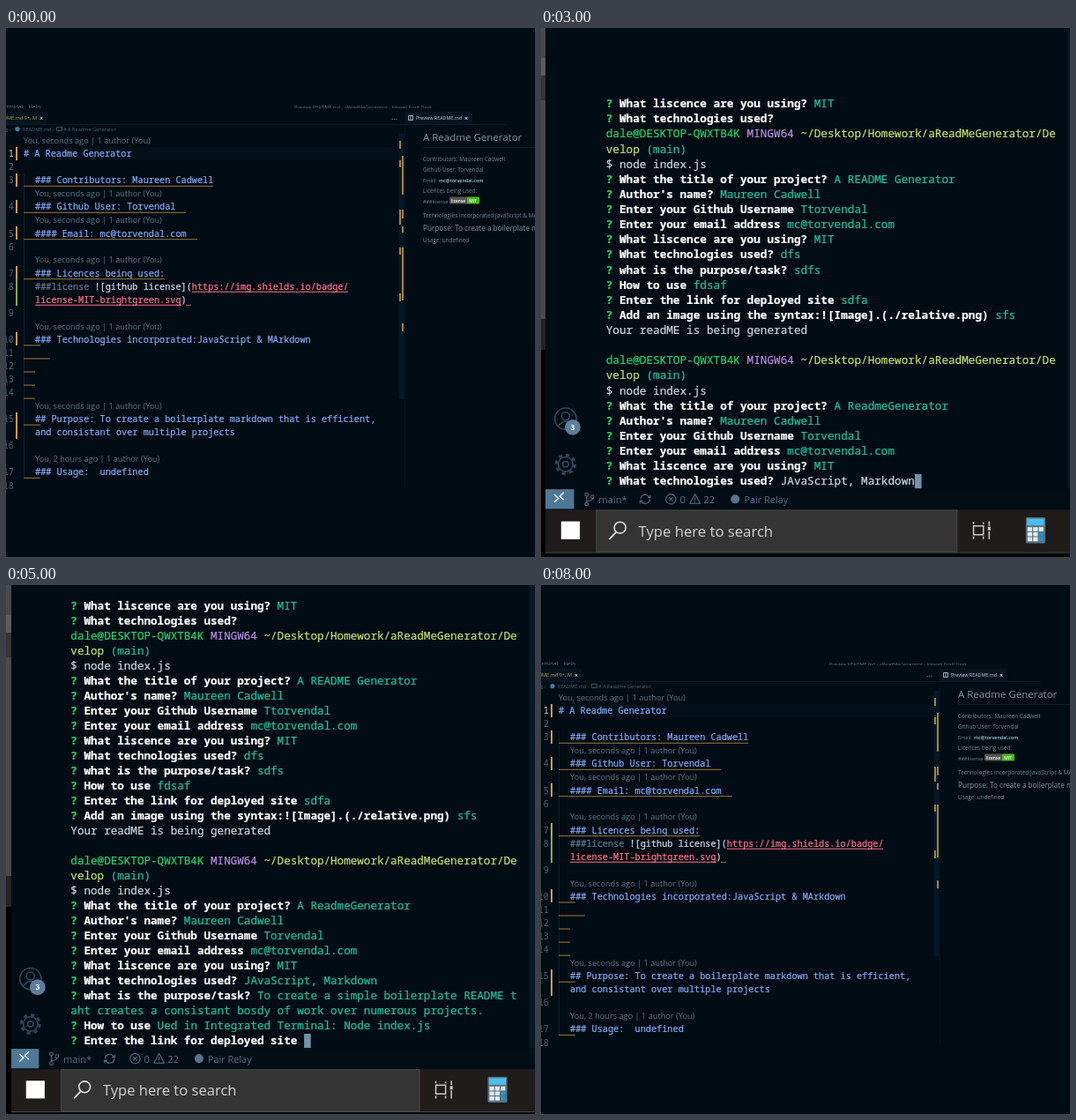
Recreate the animation shown at these times as an HTML page. Size 600 by 600 pixels, loop 9 s.

```html
<!DOCTYPE html>
<html lang="en">
<head>
<meta charset="utf-8">
<title>Readme generator</title>
<style>
  html, body { margin: 0; width: 100%; height: 100%; overflow: hidden; background: #020c14; }
  svg { display: block; width: 600px; height: 600px; }
  text { white-space: pre; font-family: "Open Sans", "Noto Sans", sans-serif; }
  .mono { font-family: "Noto Sans Mono", "DejaVu Sans Mono", monospace; stroke-width: .22px; }
</style>
</head>
<body>
<svg id="stage" viewBox="0 0 600 600" xmlns="http://www.w3.org/2000/svg"></svg>
<script>
const BG = '#020c14', SLATE = '#56748c', AMBER = '#c79f45', RUST = '#7d6230';
const GREEN = '#25d46d', TEAL = '#20c2a2', LIME = '#c3de70', MAUVE = '#bd8ce2', PALE = '#cdd7df', WHITE = '#fff';

const esc = s => s.replace(/&/g, '&amp;').replace(/</g, '&lt;');
const rect = (x, y, w, h, fill, extra = '') =>
  `<rect x="${x}" y="${y}" width="${w}" height="${h}" fill="${fill}" ${extra}/>`;
const line = (d, color, width = 1) =>
  `<path d="${d}" fill="none" stroke="${color}" stroke-width="${width}"/>`;
const ring = (x, y, r, color, width = 1, extra = '') =>
  `<circle cx="${x}" cy="${y}" r="${r}" fill="none" stroke="${color}" stroke-width="${width}" ${extra}/>`;
const dot = (x, y, r, fill) => `<circle cx="${x}" cy="${y}" r="${r}" fill="${fill}"/>`;
const text = (x, y, size, fill, s, extra = '') =>
  `<text x="${x}" y="${y}" font-size="${size}" fill="${fill}" ${extra}>${esc(s)}</text>`;
const spans = (x, y, size, parts) =>
  `<text class="mono" x="${x}" y="${y}" font-size="${size}">` + parts.map(([fill, s, weight = 400]) =>
    `<tspan fill="${fill}" stroke="${fill}" font-weight="${weight}">${esc(s)}</tspan>`).join('') + '</text>';

/* Editor with preview */

const rowY = i => 127.6 + 15.05 * i;
const HEAD = '#82aaf5';

// [row, line number, text, indent, underline end]
const codeRows = [
  [1, 1, '# A Readme Generator', 20, 0],
  [2, 2], [3, 3, '### Contributors: Maureen Cadwell', 33, 235],
  [5, 4, '### Github User: Torvendal', 33, 204],
  [7, 5, '#### Email: mc@torvendal.com', 33, 217],
  [8, 6], [10, 7, '### Licences being used:', 33, 180],
  [11, 8], [13, 9],
  [15, 10, '### Technologies incorporated:JavaScript & MArkdown', 33, 39],
  [16, 11, '', 33, 50], [17, 12, '', 33, 33], [18, 13, '', 33, 33], [19, 14, '', 33, 33],
  [21, 15, '## Purpose: To create a boilerplate markdown that is efficient,', 33, 39],
  [22, '', 'and consistant over multiple projects', 33, 0],
  [23, 16], [25, 17, '### Usage:  undefined', 33, 39], [26, 18]
];

function editor() {
  const out = [rect(0, 0, 600, 600, BG)];

  // window title and tabs
  out.push('<clipPath id="bar"><rect y="86" width="600" height="5"/></clipPath><g clip-path="url(#bar)">',
    text(-6, 91.5, 6.2, SLATE, 'Terminal    Help'),
    text(327, 91.5, 5.4, SLATE, 'Preview README.md - aReadMeGenerator - Inkwell Draft Desk'), '</g>',
    rect(0, 95, 46, 14, '#06141f'), rect(453, 95, 76, 14, '#06141f'),
    text(35, 104.3, 5.6, '#c29a4c', 'README.md 9+, M', 'text-anchor="end"'),
    text(38, 104.6, 7, PALE, '×', 'font-weight="700"'),
    text(437, 103.5, 9, '#8fa3b3', '…'),
    line('M456.5 99.5h5v5h-5zM459 99.5v5', '#9fb1bf'),
    text(465, 104.4, 5.4, '#c8d2da', 'Preview README.md'),
    text(520, 104.6, 7, PALE, '×', 'font-weight="700"'),
    line('M0 109.5H567', '#0a1a26'), line('M452.5 95V520', '#06131d'));

  // breadcrumb
  out.push(text(-1, 117, 5.8, '#4d6578', 'g ›'), dot(13, 114.7, 2.6, '#3b80a8'),
    text(19, 117, 5.6, '#4d6578', 'README.md ›'),
    line('M57.5 112.5h6v4h-6z', '#4d6578', .8), text(65, 117, 5.6, '#4d6578', '# A Readme Generator'));

  // gutter, guides and scrollbar
  out.push(rect(20, 135, 426, 15, '#03101a'), line('M20.5 165V510', '#0d202e'),
    rect(445.5, 120, 6, 301, '#061727'));
  for (const [y, h, c = AMBER] of [[135, 15], [165, 15], [195, 15], [225, 15], [270, 15],
    [285, 30, '#84aa55'], [345, 15], [436, 30]]) out.push(rect(11, y, 2, h, c));
  for (const [x, y, h] of [[446, 128, 9], [449, 145, 44], [446, 150, 8], [446, 206, 17], [449, 206, 10],
    [449, 225, 7], [449, 249, 60], [446, 249, 8], [446, 301, 9], [449, 335, 9]])
    out.push(rect(x, y, 2, h, AMBER, 'opacity=".8"'));

  // annotations above the blocks
  [0, 4, 6, 9, 14, 20, 24].forEach((r, i) => out.push(text(i ? 33 : 20, rowY(r) + 3.4, 9.2, '#5f7789',
    `You, ${i === 6 ? '2 hours' : 'seconds'} ago | 1 author (You)`)));

  for (const [r, n, s, x, end] of codeRows) {
    const y = rowY(r) + 3.6;
    out.push(text(9, y, 10.23, n === 1 ? PALE : '#4b6479', String(n), 'class="mono" text-anchor="end"'));
    if (s) out.push(spans(x, y, 10.23, [[HEAD, s, 500]]));
    if (end) out.push(line(`M20 ${rowY(r) + 6.6}H${end}`, RUST, 1.3));
  }
  const link = '#ff7089', y = rowY(11) + 3.6;
  out.push(spans(33, y, 10.23, [['#637b92', '###license '], ['#d6deeb', '![github license](', 500],
      [link, 'https://img.shields.io/badge/', 500]]),
    spans(33, y + 15.05, 10.23, [[link, 'license-MIT-brightgreen.svg', 500], ['#d6deeb', ')', 500]]),
    line('M211 299.3H388M33 314.3H199', link, 1.1), line('M204 314.5H210', RUST, 1.3));

  // rendered preview
  const ink = '#73899a';
  out.push(text(473, 128.3, 11.5, '#8497a6', 'A Readme Generator'), line('M473 135.5H600', '#0b1c28'),
    text(473, 150.6, 6.4, ink, 'Contributors: Maureen Cadwell'),
    text(473, 163, 6.4, ink, 'Github User: Torvendal'),
    text(473, 174.7, 5.6, ink, 'Email:'),
    text(491, 174.7, 5.4, '#9fd6e0', 'mc@torvendal.com', 'font-weight="600"'),
    text(473, 186.5, 6.4, ink, 'Licences being used:'),
    text(473, 199.2, 5.5, ink, '###license'),
    rect(503, 191.5, 21, 8, '#555', 'rx="1"'), rect(523, 191.5, 14, 8, '#43b81c', 'rx="1"'),
    text(505, 197.5, 4.8, WHITE, 'license', 'font-weight="600"'),
    text(525.3, 197.5, 4.8, WHITE, 'MIT', 'font-weight="600"'),
    text(473, 214.5, 6.5, ink, 'Technologies incorporated:JavaScript & MArkdown'),
    text(473, 229.6, 8.2, '#8497a6', 'Purpose: To create a boilerplate markdown that is efficient'),
    text(473, 243.3, 6.4, ink, 'Usage: undefined'));
  return out.join('');
}

/* Terminal */

const COLS = 67, CELL = 7.52, ROW = 16.92, LEFT = 75.3, BOTTOM = 516;

const ask = (label, reply = '') => [[GREEN, '? ', 700], [WHITE, label + ' ', 700], [TEAL, reply]];
const prompt = [[GREEN, 'dale@DESKTOP-QWXTB4K '], [MAUVE, 'MINGW64 '],
  [LIME, '~/Desktop/Homework/aReadMeGenerator/Develop '], [TEAL, '(main)']];
const say = s => [[PALE, s]];

const session = (title, author, user, mail, license, tech, task, use, site, image) => [
  prompt, say('$ node index.js'),
  ask('What the title of your project?', title),
  ask("Author's name?", author),
  ask('Enter your Github Username', user),
  ask('Enter your email address', mail),
  ask('What liscence are you using?', license),
  ask('What technologies used?', tech),
  ask('what is the purpose/task?', task),
  ask('How to use', use),
  ask('Enter the link for deployed site', site),
  ask('Add an image using the syntax:![Image].(./relative.png)', image),
  say('Your readME is being generated'), say('')
];

const entries = [
  ask('What liscence are you using?', 'MIT'), ask('What technologies used?'),
  ...session('A README Generator', 'Maureen Cadwell', 'Ttorvendal', 'mc@torvendal.com', 'MIT',
    'dfs', 'sdfs', 'fdsaf', 'sdfa', 'sfs'),
  ...session('A ReadmeGenerator', 'Maureen Cadwell', 'Torvendal', 'mc@torvendal.com', 'MIT',
    'JAvaScript, Markdown',
    'To create a simple boilerplate README taht creates a consistant bosdy of work over numerous projects.',
    'Ued in Integrated Terminal: Node index.js', 'none', 'none'),
  prompt, say('$ ')
];

// Splits coloured parts into rows of COLS cells.
function wrap(parts) {
  const rows = [[]];
  let used = 0;
  for (let [fill, s, weight] of parts) {
    while (s) {
      if (used === COLS) { rows.push([]); used = 0; }
      const piece = s.slice(0, COLS - used);
      rows[rows.length - 1].push([fill, piece, weight]);
      used += piece.length;
      s = s.slice(piece.length);
    }
  }
  return { rows, used };
}

// count: entries shown; typed: letters of the last reply; scale, x, y: camera; edge: left strip
const shots = [
  { count: 20, typed: 15, scale: 1, x: 0, y: 0, edge: 5 },
  { count: 22, typed: 12, scale: 1.006, x: -1.2, y: -4, edge: 5 },
  { count: 24, typed: 20, scale: 1.0125, x: -2.5, y: -8.4, edge: 5 },
  { count: 25, typed: 72, scale: 1.009, x: -2.5, y: -5, edge: 5 },
  { count: 27, typed: 0, scale: 1.006, x: -2.4, y: -2.1, edge: 6 },
  { count: 28, typed: 4, scale: 1.007, x: -4, y: -2, edge: 4 },
  { count: 32, scale: 1.008, x: -5.7, y: -2, edge: 2 }
];

function chrome() {
  const ic = SLATE, dim = '#2f475a', bar = '#c9c9c9';
  return [
    // activity icons
    ring(30, 446, 12, dim, 1.6), ring(30, 443, 4.5, dim, 1.6),
    line('M22 454q8 -10 16 0', dim, 1.6), dot(38, 455.5, 8.8, '#5d7e9c'),
    text(38, 458.7, 8.5, WHITE, '3', 'text-anchor="middle" font-weight="700"'),
    ring(30, 497, 10.4, dim, 3, 'stroke-dasharray="4.08 4.08"'),
    ring(30, 497, 8.2, dim, 1.6), ring(30, 497, 3.2, dim, 1.6),
    // status bar
    rect(0, 525, 620, 23, '#020d16'), rect(3, 525, 36.5, 22, '#4d7896'),
    line('M17.5 531l4.5 4.2l-4.5 4.2M28 528.5l-4.5 4.2l4.5 4.2', WHITE, 1.3),
    ring(53.5, 531, 1.9, ic), ring(53.5, 541.5, 1.9, ic), ring(60, 533.5, 1.9, ic),
    line('M53.5 533v6.5M60 535.5q0 2.5 -6 3', ic),
    text(67, 540.5, 11, ic, 'main*'),
    line('M114 536a5.2 5.2 0 0 1 10 -1.5M124.5 536a5.2 5.2 0 0 1 -10 1.8M122 534.5h3v-3M116.5 538h-3v3', ic, 1.1),
    ring(148, 536, 5.6, ic), line('M145.8 533.8l4.4 4.4m0 -4.4l-4.4 4.4', ic),
    text(158, 540.5, 11, ic, '0'),
    line('M175 530.5l5.8 10.5h-11.6zM175 534v4M175 539v1', ic), text(184.5, 540.5, 11, ic, '22'),
    dot(220, 536, 5, ic), text(230, 540.5, 10.8, ic, 'Pair Relay'),
    // taskbar
    rect(0, 548, 620, 47.5, '#1f1c1b'), rect(0, 595.5, 620, 20, '#050708'), rect(0, 595.5, 620, 1, '#4a4a4a'),
    rect(64.5, 548.5, 404, 46.5, '#343434', 'stroke="#484848"'),
    rect(25, 561, 21, 20, WHITE),
    ring(91, 568, 6.4, '#dcdcdc', 1.6), line('M86.5 573L79 581', '#dcdcdc', 1.8),
    text(111.6, 577.8, 16.5, '#d2d2d2', 'Type here to search'),
    line('M487 566h11v10h-11zM487 562.5v-1M487 580v1M498 562v2M487 562v2M487 578v3M498 578v3M504.5 561v5M504.5 572v9', bar, 1.5),
    rect(503, 567, 3, 4, bar),
    rect(545.5, 556.5, 22, 29, '#56707f', 'rx="1.5"'), rect(547, 558, 19, 7.5, '#4dbdec'),
    ...[0, 1, 2, 3, 4, 5, 6, 7, 8].map(i => rect(547.5 + i % 3 * 6.3, 567.5 + (i / 3 | 0) * 5.6, 5.2, 4.6,
      i % 3 === 2 && i > 2 ? '#2d8fca' : '#e4ebef')),
    // panel edge
    rect(592, -20, 30, 544, '#071827')
  ].join('');
}
const frameParts = chrome();

function strip(w) {
  return rect(0, 0, w, 600, '#000') + rect(0, 0, w, 330, '#47494b') +
    rect(0, 34, w, 20, '#5a5c5e') + rect(0, 54, w, 28, '#333537') + rect(0, 330, w, 35, '#222426');
}

function terminal({ count, typed, scale, x, y, edge }) {
  const shown = entries.slice(0, count);
  if (typed !== undefined) {
    const [mark, label, reply] = shown[count - 1];
    shown[count - 1] = [mark, label, [PALE, reply[1].slice(0, typed)]];
  }
  const wrapped = shown.map(wrap);
  const rows = wrapped.flatMap(w => w.rows);
  const top = BOTTOM - ROW * (rows.length - 1);
  const cursor = LEFT + CELL * wrapped[count - 1].used;
  return rect(0, 0, 600, 600, BG) +
    `<g transform="translate(${x} ${y}) scale(${scale})">` +
    rows.map((r, i) => spans(LEFT, top + ROW * i + 4.3, CELL / .6, r)).join('') +
    rect(cursor, BOTTOM - 8, CELL, 16, '#6f93ad') + frameParts + '</g>' + strip(edge);
}

/* Playback */

const STEP = 1000;
const scenes = [editor(), ...shots.map(terminal), editor()];
const stage = document.getElementById('stage');
const start = performance.now();
let current = -1;

function tick() {
  const i = Math.floor((performance.now() - start) / STEP) % scenes.length;
  if (i !== current) stage.innerHTML = scenes[current = i];
  requestAnimationFrame(tick);
}
tick();
</script>
</body>
</html>
```
